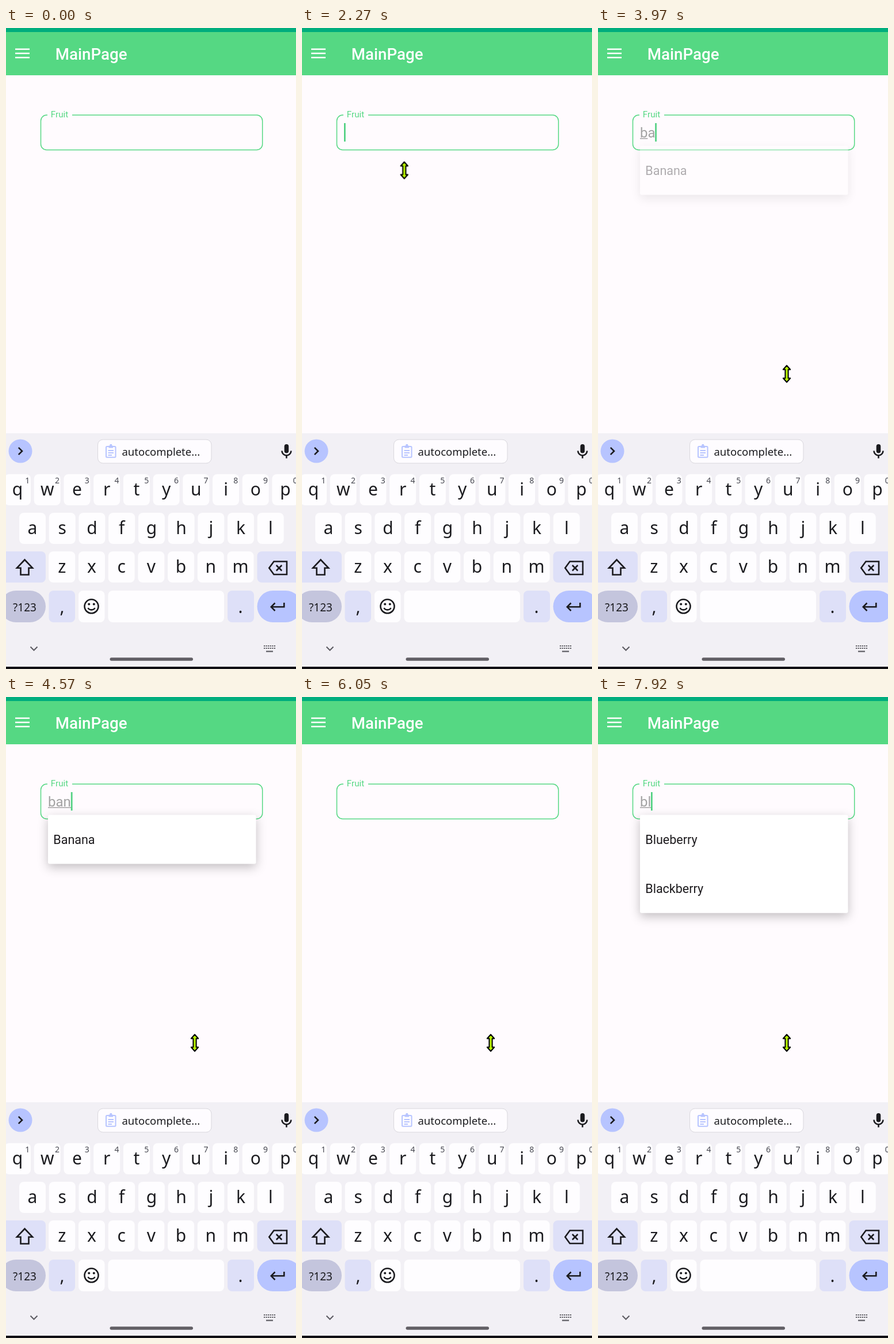
An HTML page that plays this animation: 504 by 1112 pixels, repeating every 8 s.

```html
<!DOCTYPE html>
<html lang="en">
<head>
<meta charset="utf-8">
<title>Fruit autocomplete</title>
<style>
html, body { margin: 0; width: 100%; height: 100%; overflow: hidden; background: #fffbfe; }
svg { display: block; width: 504px; height: 1112px; }
text { font-family: Roboto, sans-serif; }
.kb text { font-family: "Noto Sans", "Open Sans", sans-serif; fill: #1b1b1f; text-anchor: middle; }
.key { font-size: 30px; }
.kb .num { font-size: 14px; fill: #45464f; }
.ink { fill: none; stroke: #1b1b1f; stroke-width: 2.6; }
.typed { font-size: 24px; fill: #a3a3a3; }
.item { font-size: 21.5px; fill: #1d1b1e; }
.card { fill: #fff; filter: drop-shadow(0 6px 9px rgba(0,0,0,.24)); }

/* 1% of the loop = 80 ms */
.anim { animation: 8s step-end infinite; }
#caret { animation-name: blink, caretMove; animation-duration: 8s; animation-timing-function: step-end; animation-iteration-count: infinite; }
#pointer { animation-name: glide; }
#under { animation-name: underline; }
#b { animation-name: typeB; }
#a { animation-name: typeA; }
#n { animation-name: typeN; }
#l { animation-name: typeL; }
#one { animation-name: listOne; }
#two { animation-name: listTwo; }

@keyframes blink {
  0%, 7.5%, 19.875%, 32.75%, 75.625%, 88.125% { opacity: 0; }
  .875%, 13.25%, 25.75%, 38.875%, 81.5%, 93.875%, 100% { opacity: 1; }
}
@keyframes caretMove {
  0%, 68.875% { transform: none; }
  45.5%, 66.25%, 94.75% { transform: translateX(13.2px); }
  48.75%, 63.75% { transform: translateX(26.2px); }
  54.625% { transform: translateX(39.8px); }
  96.375%, 100% { transform: translateX(19px); }
}
@keyframes underline {
  0%, 68.875% { width: 0; }
  45.5%, 66.25%, 94.75% { width: 13.4px; }
  50.5%, 63.75% { width: 26.6px; }
  57.125% { width: 40px; }
  97.25%, 100% { width: 19.4px; }
}
@keyframes typeB { 0%, 68.875% { opacity: 0; } 45.5%, 94.75%, 100% { opacity: 1; } }
@keyframes typeA { 0%, 66.25%, 100% { opacity: 0; } 48.75% { opacity: 1; } }
@keyframes typeN { 0%, 63.75%, 100% { opacity: 0; } 54.625% { opacity: 1; } }
@keyframes typeL { 0% { opacity: 0; } 96.375%, 100% { opacity: 1; } }
@keyframes listOne {
  0%, 68.875%, 100% { opacity: 0; }
  49.625% { opacity: .35; }
  50.5% { opacity: .8; }
  51.25% { opacity: 1; }
  67.125% { opacity: .65; }
  68% { opacity: .25; }
}
@keyframes listTwo {
  0% { opacity: 0; }
  97.25% { opacity: .35; }
  98.125% { opacity: .8; }
  99%, 100% { opacity: 1; }
}
@keyframes glide {
  0% { transform: translate(444px, 1052px); opacity: 0; }
  24% { transform: translate(444px, 1052px); opacity: 1; }
  24.875% { transform: translate(408px, 925px); }
  25.75% { transform: translate(335px, 690px); }
  26.625% { transform: translate(254px, 450px); }
  27.5% { transform: translate(202px, 312px); }
  28.375% { transform: translate(177.7px, 246.8px); }
  29.25% { transform: translate(160px, 220px); }
  30.125% { transform: translate(143px, 201px); }
  31% { transform: translate(128px, 187px); }
  31.875% { transform: translate(117px, 177px); }
  32.75% { transform: translate(112px, 173px); }
  35.25% { transform: translate(145px, 222px); }
  36.125% { transform: translate(180px, 322px); }
  37% { transform: translate(238px, 452px); }
  37.875% { transform: translate(300px, 560px); }
  38.875%, 100% { transform: translate(328px, 600px); opacity: 1; }
}
</style>
</head>
<body>
<svg viewBox="0 0 504 1112">
  <rect width="504" height="1112" fill="#fffbfe"/>
  <rect width="504" height="82" fill="#55d883"/>
  <rect width="504" height="7" fill="#00ad7d"/>
  <path d="M16 36.7H41M16 44H41M16 51.3H41" stroke="#fff" stroke-width="2.5"/>
  <text x="85.8" y="55" font-size="27.7" font-weight="500" fill="#fff">MainPage</text>

  <path d="M72 151H70.500A10 10 0 0 0 60.500 161V201.500A10 10 0 0 0 70.500 211.500H435.700A10 10 0 0 0 445.700 201.500V161A10 10 0 0 0 435.700 151H115" fill="none" stroke="#55d883" stroke-width="1.5"/>
  <text x="77.800" y="154.500" font-size="15.200" fill="#55d883">Fruit</text>

  <g class="typed">
    <text id="b" class="anim" x="73" y="190">b</text>
    <text id="a" class="anim" x="86.500" y="190">a</text>
    <text id="n" class="anim" x="99.500" y="190">n</text>
    <text id="l" class="anim" x="86.500" y="190">l</text>
    <rect id="under" class="anim" x="73" y="191" width="0" height="1.500"/>
  </g>
  <rect id="caret" x="73" y="165" width="2.700" height="32" fill="#4fd080"/>

  <g id="one" class="anim">
    <rect class="card" x="73" y="204.500" width="361.500" height="85" rx="3"/>
    <text class="item" x="82.300" y="255">Banana</text>
  </g>
  <g id="two" class="anim">
    <rect class="card" x="73" y="204.500" width="361.500" height="170.300" rx="3"/>
    <text class="item" x="82.300" y="255">Blueberry</text>
    <text class="item" x="82.300" y="340.300">Blackberry</text>
  </g>

  <g class="kb">
    <rect y="703" width="504" height="405" fill="#f2f0f5"/>
    <rect y="1108" width="504" height="4" fill="#111014"/>
    <circle cx="25" cy="734" r="20.500" fill="#b7c4ff"/>
    <path class="ink" d="M21.800 727.800L28 734L21.800 740.200"/>
    <rect x="159.500" y="714" width="197.500" height="41" rx="9" fill="#fefcff" stroke="#d9d7dd"/>
    <g fill="none" stroke="#b7c4ff" stroke-width="2">
      <rect x="174" y="726" width="16.500" height="18.800" rx="1.500"/>
      <path d="M177.500 733H187M177.500 737H187M177.500 741H184"/>
      <path d="M178.500 726.500H186M180.500 724H184" stroke-width="4"/>
    </g>
    <text x="269.300" y="742" font-size="18.500" font-weight="500">autocomplete...</text>
    <rect x="483.700" y="722" width="7.600" height="15.500" rx="3.800" fill="#1b1b1f"/>
    <path class="ink" stroke-width="2" d="M479.500 733.500A8 8 0 0 0 495.500 733.500M487.500 741V746.500"/>

    <g id="keys"></g>

    <path class="ink" d="M32.500 922.500L46 936.700H39.500V948.500H25.500V936.700H19Z"/>
    <path class="ink" d="M465.500 925.500H488V948H465.500L457.300 936.700ZM469.800 932L479.300 941.500M479.300 932L469.800 941.500"/>
    <circle class="ink" cx="148.500" cy="1003.300" r="12"/>
    <g fill="#1b1b1f"><circle cx="144.200" cy="999.500" r="2"/><circle cx="152.800" cy="999.500" r="2"/></g>
    <path class="ink" d="M142.500 1006A6.500 5.500 0 0 0 154.500 1006" stroke-width="2.300"/>
    <path class="ink" d="M483.300 997V1004.300H461.500M467.500 997.500L460.800 1004.300L467.500 1011"/>
    <text x="32.500" y="1011.500" font-size="19" font-weight="500">?123</text>
    <path d="M42.500 1073.500L48.500 1079.500L54.500 1073.500" fill="none" stroke="#5d5c62" stroke-width="2"/>
    <path d="M448 1072H468M448 1076H468" stroke="#5d5c62" stroke-width="2.200" stroke-dasharray="2.200 1.360"/>
    <path d="M452 1081.500H464" stroke="#5d5c62" stroke-width="2.200"/>
    <rect x="180.500" y="1092.300" width="144.500" height="5.500" rx="2.750" fill="#625f65"/>
  </g>

  <g id="pointer" class="anim">
    <path d="M0 -14.500L6.200 -7.500H2.600V7.500H6.200L0 14.500L-6.200 7.500H-2.600V-7.500H-6.200Z" fill="#b9f500" stroke="#000" stroke-width="2" stroke-linejoin="round"/>
  </g>
</svg>
<script>
const PITCH = 51.72, WHITE = '#fefdff', SOFT = '#dee0f8';
const box = (x, y, w, fill, h = 54, r = 8) =>
  `<rect x="${x}" y="${y}" width="${w}" height="${h}" rx="${r}" fill="${fill}"/>`;
const label = (x, y, s, cls = 'key') => `<text class="${cls}" x="${x}" y="${y}">${s}</text>`;

const row = (letters, x0, top, digits = '') => [...letters].map((ch, i) => {
  const x = x0 + i * PITCH;
  return box(x - 23, top, 46, WHITE) + label(x, top + 37, ch) +
    (digits ? label(x + 17.3, top + 15.5, digits[i], 'num') : '');
}).join('');

document.getElementById('keys').innerHTML =
  row('qwertyuiop', 20, 774, '1234567890') +
  row('asdfghjkl', 46, 841) +
  row('zxcvbnm', 97.2, 908) +
  box(-10, 908, 79, SOFT) + box(436.5, 908, 80, SOFT) +
  box(-10, 976, 79, '#c4c5dd', 55, 27.5) +
  box(74.5, 976, 45.5, SOFT, 55) + label(97.5, 1015, ',') +
  box(126, 976, 45.5, WHITE, 55) +
  box(177.5, 976, 201.5, WHITE, 55) +
  box(385, 976, 46, SOFT, 55) + label(407.5, 1015, '.') +
  box(436.5, 976, 77, '#b7c4ff', 55, 27.5);
</script>
</body>
</html>
```
